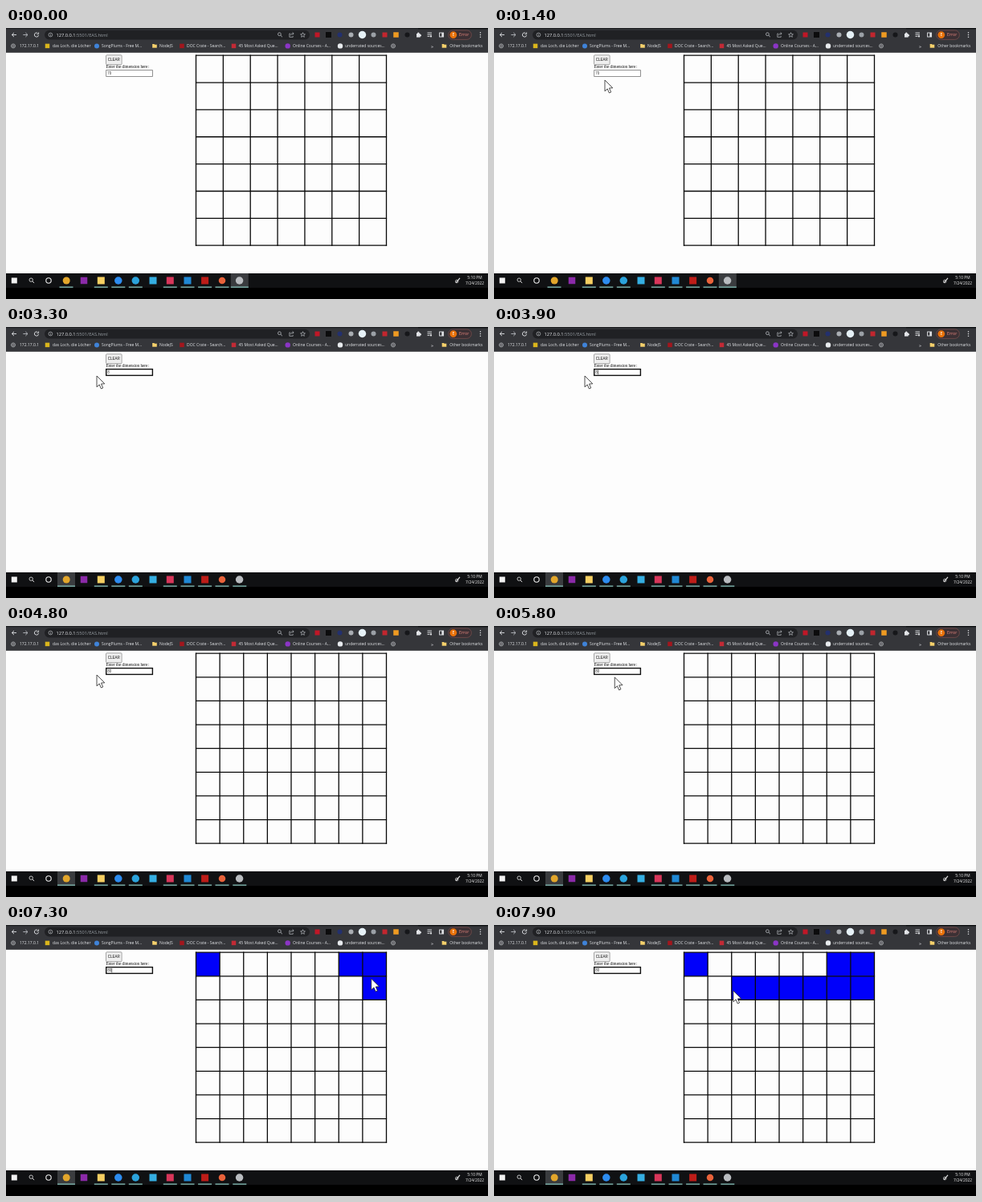
An HTML page with a canvas that plays this animation: 600x338 px, repeating every 8000 ms.

```html
<!DOCTYPE html>
<html lang="en">
<head>
<meta charset="utf-8">
<title>Grid painter</title>
<style>
html, body { margin: 0; width: 100%; height: 100%; overflow: hidden; background: #000; }
canvas { display: block; width: 600px; height: 338px; }
</style>
</head>
<body>
<canvas id="stage"></canvas>
<script>
const LOOP = 8000;
const UI = '"Open Sans", sans-serif';
const SANS = '"Liberation Sans", Arial, sans-serif';
const SERIF = '"Liberation Serif", "Times New Roman", serif';
const GRID = { x: 236.5, y: 34.2, size: 237 };
const FIELD = { x: 124.3, y: 52.2, w: 58.5, h: 8.6 };
const TIME = { focus: 1800, select: 1950, typed: 2800, cleared: 3000, redrawn: 4000 };

const canvas = document.getElementById('stage');
const ctx = canvas.getContext('2d');
const ratio = window.devicePixelRatio || 1;
canvas.width = 600 * ratio;
canvas.height = 338 * ratio;

function rect(x, y, w, h, color) {
  ctx.fillStyle = color;
  ctx.fillRect(x, y, w, h);
}

function box(x, y, w, h, color, width = 0.8) {
  ctx.strokeStyle = color;
  ctx.lineWidth = width;
  ctx.strokeRect(x, y, w, h);
}

function pill(x, y, w, h, r, fill, stroke) {
  ctx.beginPath();
  ctx.roundRect(x, y, w, h, r);
  if (fill) { ctx.fillStyle = fill; ctx.fill(); }
  if (stroke) { ctx.strokeStyle = stroke; ctx.lineWidth = 0.6; ctx.stroke(); }
}

function disc(x, y, r, color) {
  ctx.beginPath();
  ctx.arc(x, y, r, 0, Math.PI * 2);
  ctx.fillStyle = color;
  ctx.fill();
}

function ring(x, y, r, color, width = 0.8, from = 0, to = Math.PI * 2) {
  ctx.beginPath();
  ctx.arc(x, y, r, from, to);
  ctx.strokeStyle = color;
  ctx.lineWidth = width;
  ctx.stroke();
}

function path(points, color, width = 0.9) {
  ctx.beginPath();
  points.forEach(([x, y], i) => i ? ctx.lineTo(x, y) : ctx.moveTo(x, y));
  ctx.strokeStyle = color;
  ctx.lineWidth = width;
  ctx.stroke();
}

function text(str, x, y, size, color, family = UI, align = 'left') {
  ctx.font = `${size}px ${family}`;
  ctx.textAlign = align;
  ctx.fillStyle = color;
  ctx.fillText(str, x, y);
}

const mark = (x, y, size, color, round) =>
  round ? disc(x, y, size / 2, color) : rect(x - size / 2, y - size / 2, size, size, color);

function magnifier(x, y, color, r = 1.9) {
  ring(x - 0.6, y - 0.6, r, color);
  path([[x + r * 0.5, y + r * 0.5], [x + r * 1.5, y + r * 1.5]], color);
}

function globe(x, y) {
  ring(x, y, 2.5, '#c4c7cb', 0.7);
  path([[x - 2.4, y], [x + 2.4, y]], '#c4c7cb', 0.5);
  path([[x, y - 2.4], [x, y + 2.4]], '#c4c7cb', 0.5);
}

function folder(x, y, color) {
  rect(x - 2.8, y - 2.4, 2.6, 1.2, color);
  rect(x - 2.8, y - 1.7, 5.6, 4, color);
}

function star(x, y, color) {
  const points = [];
  for (let i = 0; i <= 10; i++) {
    const a = -Math.PI / 2 + i * Math.PI / 5, r = i % 2 ? 1.4 : 3.1;
    points.push([x + r * Math.cos(a), y + r * Math.sin(a)]);
  }
  path(points, color, 0.7);
}

function toolbar() {
  const light = '#e3e5e8', dim = '#b9bdc2';
  rect(0, 0, 600, 30.8, '#35363a');
  rect(0, 0, 600, 1.3, '#202124');
  rect(513, 0, 87, 1.3, '#111214');

  path([[13, 8.5], [7.4, 8.5]], light);
  path([[10, 5.9], [7.3, 8.5], [10, 11.1]], light);
  path([[21.3, 8.5], [26.9, 8.5]], dim);
  path([[24.3, 5.9], [27, 8.5], [24.3, 11.1]], dim);
  ring(38, 8.5, 2.6, light, 0.9, 0.2, 5.3);
  path([[40.6, 5.4], [40.6, 7.7], [38.4, 7.7]], light, 0.8);

  pill(48, 2.8, 330, 11.6, 5.8, '#202124');
  ring(55.4, 8.5, 2.4, dim, 0.7);
  path([[55.4, 8.2], [55.4, 10]], dim, 0.7);
  path([[55.4, 6.9], [55.4, 7.5]], dim, 0.7);
  text('127.0.0.1', 62.5, 10.6, 5.7, '#e8eaed');
  const hostWidth = ctx.measureText('127.0.0.1').width;
  text(':5501/EAS.html', 62.5 + hostWidth, 10.6, 5.7, '#9aa0a6');

  magnifier(341, 8.3, dim);
  path([[354, 7], [352.8, 7], [352.8, 11.3], [357.2, 11.3], [357.2, 9.8]], dim, 0.7);
  path([[354.2, 9.3], [355.2, 7.3], [358, 6.9]], dim, 0.7);
  path([[356.6, 5.4], [358.2, 6.9], [356.6, 8.4]], dim, 0.7);
  star(369.5, 8.8, dim);

  [
    [387.5, 6, '#c01727', 0], [401.5, 7, '#0c0c0d', 0], [415.5, 6, '#23306e', 1],
    [429.5, 6, '#a9adb2', 1], [443.5, 9.5, '#e6f1f7', 1], [457.5, 6, '#9ba0a6', 1],
    [471.5, 6, '#c2262e', 0], [485.5, 6.5, '#ee9a22', 0], [499.5, 6, '#16171a', 1]
  ].forEach(([x, size, color, round]) => mark(x, 8.5, size, color, round));

  rect(511, 7, 4.6, 4.6, light);
  disc(513.3, 6.7, 1.2, light);
  disc(515.8, 9.3, 1.2, light);
  [6, 8.2, 10.4].forEach((y, i) => path([[524.5, y], [i === 2 ? 527.5 : 530, y]], light));
  disc(529, 10.4, 1.1, light);
  box(539.6, 6, 5, 5, light, 0.9);
  rect(542.4, 6, 2.2, 5, light);

  pill(550.6, 2.8, 28.8, 11.6, 5.8, '#3c3034', '#8a5752');
  disc(556.8, 8.6, 4.4, '#e8710a');
  text('E', 556.8, 10.4, 5, '#fff', UI, 'center');
  text('Error', 564, 10.4, 5.2, '#f28b82');
  [5.8, 8.5, 11.2].forEach(y => disc(590.5, y, 0.75, light));
}

function bookmarks() {
  const color = '#e2e4e7', y = 22.4;
  [
    ['172.17.0.1', 17], ['das Loch, die Löcher', 58], ['SongPlums - Free M...', 119],
    ['NodeJS', 191], ['DOC Crate - Search...', 225], ['45 Most Asked Que...', 289.5],
    ['Online Courses - A...', 357], ['underrated sources...', 422], ['Other bookmarks', 552.3]
  ].forEach(([label, x]) => text(label, x, 24.4, 5, color));

  globe(9, y);
  globe(482, y);
  mark(51.5, y, 5.5, '#d9b51c', 0);
  mark(113, y, 6, '#3f83d8', 1);
  folder(185, y, '#f3cf6b');
  mark(219, y, 5.5, '#a3161d', 0);
  mark(283.5, y, 5.5, '#c22a35', 0);
  mark(350.7, y, 6.4, '#8b35c6', 1);
  mark(416, y, 6.4, '#e7eaed', 1);
  text('»', 529, 24.5, 6, color);
  folder(545.5, y, '#f3cf6b');
}

function taskbar(browserActive) {
  rect(0, 306, 600, 32, '#000');
  rect(0, 306, 600, 18, '#101113');
  rect(browserActive ? 64 : 279.8, 306, 22, 18, '#3a3c3f');

  mark(10.3, 315, 7, '#f2f2f2', 0);
  magnifier(31.8, 314.8, '#eee', 2.2);
  ring(53, 315, 3.2, '#eee', 1.1);
  [
    [75.2, 9, '#e2a62b', 1], [97, 8.5, '#8b2aa8', 0], [118.3, 9, '#f6cf62', 0],
    [139.8, 9.5, '#2d8cf0', 1], [161.3, 9.5, '#2ba3dc', 1], [183, 9, '#35aee2', 0],
    [204.3, 9, '#d8365a', 0], [226, 9, '#2089d5', 0], [247.6, 9, '#bd1d18', 0],
    [269, 8.5, '#e8623a', 1], [290.6, 9.5, '#b9bcc0', 1]
  ].forEach(([x, size, color, round]) => mark(x, 315, size, color, round));

  [75, 118.3, 139.8, 161.3, 204.3, 226, 247.6, 269, 290.8].forEach(x => {
    const active = browserActive ? x === 75 : x === 290.8;
    const width = active ? 22 : 17;
    rect(x - width / 2, 322.5, width, 1.4, '#7fb5ae');
  });

  path([[560, 317.8], [565, 311.8]], '#e5e5e5', 1.2);
  ring(561.2, 316, 1.8, '#e5e5e5', 0.7);
  text('5:10 PM', 583.5, 312.6, 4.9, '#f3f3f3', UI, 'center');
  text('7/24/2022', 583.5, 320.2, 4.9, '#f3f3f3', UI, 'center');
}

function form(t) {
  pill(124.5, 33.8, 19.6, 11.8, 1, '#efefef', '#6e6e6e');
  text('CLEAR', 134.3, 41.3, 4.5, '#111', SANS, 'center');
  text('Enter the dimension here:', 124.4, 50.2, 5.2, '#111', SERIF);

  const focused = t >= TIME.focus;
  const { x, y, w, h } = FIELD;
  rect(x, y, w, h, '#fff');
  box(x + 0.4, y + 0.4, w - 0.8, h - 0.8, focused ? '#101010' : '#767676', focused ? 1.4 : 0.8);

  const value = t < TIME.typed ? '70' : t < TIME.redrawn ? '8' : '80';
  const left = 126.3, base = 58.2;
  ctx.font = `4.5px ${SANS}`;
  const width = ctx.measureText(value).width;
  const selected = t < TIME.typed ? Math.min(1, Math.max(0, (t - TIME.select) / 250)) : 0;
  rect(left + width * (1 - selected), 53.7, width * selected, 5.8, '#3a8fe0');
  text(value, left, base, 4.5, selected === 1 ? '#fff' : '#333', SANS);

  const lastKey = t < TIME.typed ? TIME.focus : t < TIME.redrawn ? TIME.typed : TIME.redrawn;
  if (focused && !selected && (t - lastKey) % 1000 < 500) {
    rect(left + width + 0.2, 53.8, 0.6, 5.5, '#111');
  }
}

// Each painted cell: column, row, moment it turns blue.
const painted = [[0, 0, 6700], [6, 0, 7000], [7, 0, 7100]];
for (let col = 7; col >= 2; col--) painted.push([col, 1, 7300 + (7 - col) * 100]);

function grid(t) {
  if (t >= TIME.cleared && t < TIME.redrawn) return;
  const count = t < TIME.cleared ? 7 : 8;
  const step = GRID.size / count;
  for (const [col, row, at] of painted) {
    if (t >= at) rect(GRID.x + col * step, GRID.y + row * step, step, step, '#0000fa');
  }
  for (let i = 0; i <= count; i++) {
    const x = GRID.x + i * step, y = GRID.y + i * step;
    path([[x, GRID.y - 0.6], [x, GRID.y + GRID.size + 0.6]], '#080808', 1.3);
    path([[GRID.x - 0.6, y], [GRID.x + GRID.size + 0.6, y]], '#080808', 1.3);
  }
}

const route = [
  [250, 291, 314], [900, 151, 110], [1400, 138, 65], [1700, 133, 57], [1950, 133, 57],
  [2200, 113, 61], [5400, 113, 61], [6100, 178, 66], [6600, 244.5, 48], [6750, 249, 48],
  [7000, 440, 50], [7150, 459, 53], [7300, 455, 67], [7900, 298, 82], [8000, 286, 83]
];

function pointerAt(t) {
  const i = route.findIndex(([at]) => at > t);
  if (i < 1) return null;
  const [t0, x0, y0] = route[i - 1], [t1, x1, y1] = route[i];
  const k = (t - t0) / (t1 - t0);
  return [x0 + (x1 - x0) * k, y0 + (y1 - y0) * k];
}

function pointer(t) {
  const spot = pointerAt(t);
  if (!spot) return;
  const [x, y] = spot;
  const overField = x > FIELD.x && x < FIELD.x + FIELD.w && y > FIELD.y && y < FIELD.y + FIELD.h;
  if (overField) {
    path([[x, y - 4], [x, y + 4]], '#222', 0.8);
    [-4, 4].forEach(d => path([[x - 1.6, y + d], [x + 1.6, y + d]], '#222', 0.7));
    return;
  }
  const shape = [[0, 0], [0, 13.8], [3.2, 10.9], [5.4, 16], [7.7, 15], [5.5, 10], [9.8, 9.8]];
  ctx.beginPath();
  shape.forEach(([dx, dy]) => ctx.lineTo(x + dx, y + dy));
  ctx.closePath();
  ctx.fillStyle = '#fff';
  ctx.fill();
  ctx.strokeStyle = '#222';
  ctx.lineWidth = 0.8;
  ctx.stroke();
}

function draw(t) {
  ctx.setTransform(ratio, 0, 0, ratio, 0, 0);
  rect(0, 0, 600, 338, '#fdfdfd');
  toolbar();
  bookmarks();
  form(t);
  grid(t);
  taskbar(t >= 1900);
  pointer(t);
}

const start = performance.now();
function tick() {
  draw((performance.now() - start) % LOOP);
  requestAnimationFrame(tick);
}
tick();
</script>
</body>
</html>
```
